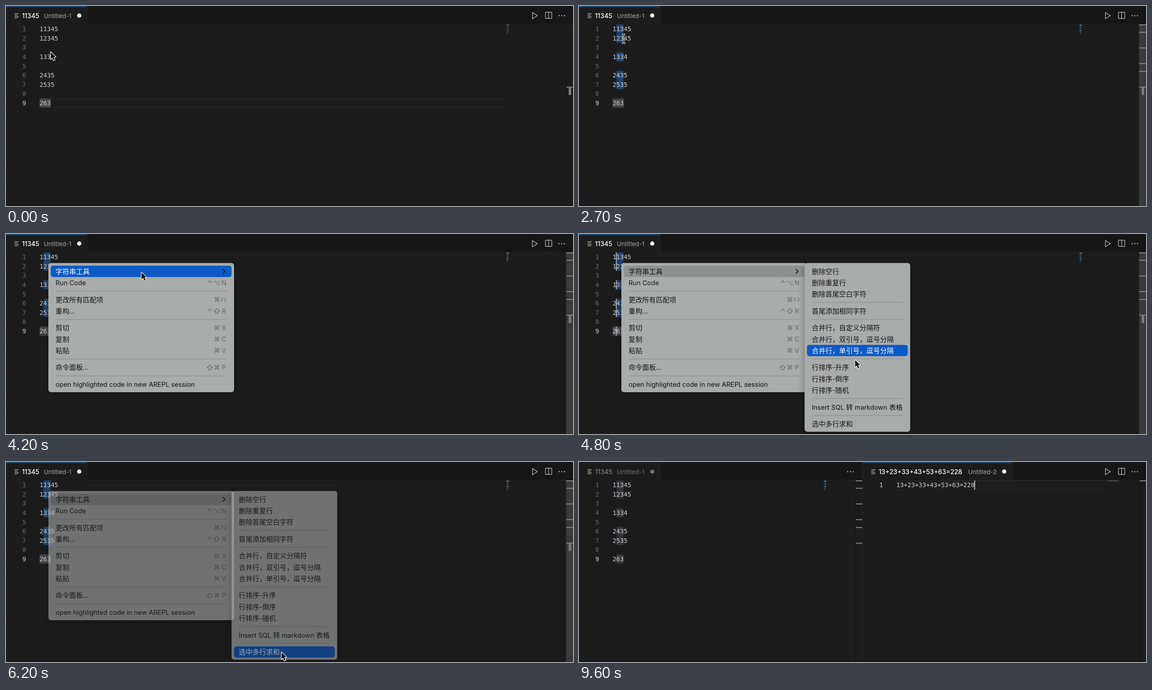
Write an HTML page with a canvas that moves like this. It is 1258 px wide and 445 px high and loops after 9.7 s.

```html
<!DOCTYPE html>
<html lang="zh-CN">
<head>
<meta charset="utf-8">
<title>Editor: sum selected lines</title>
<style>
html, body { margin: 0; width: 100%; height: 100%; overflow: hidden; background: #1c1c1c; }
canvas { display: block; width: 1258px; height: 445px; }
</style>
</head>
<body>
<canvas id="stage" width="1258" height="445"></canvas>
<script>
const W = 1258, H = 445, LOOP = 9700, STEP = 100;
const main = document.getElementById('stage').getContext('2d');
const layer = document.createElement('canvas');
layer.width = W;
layer.height = H;
const layerCtx = layer.getContext('2d');
let ctx = main;

const MONO = '13.74px "DejaVu Sans Mono", monospace';
const UI = 'Inter, "Noto Sans CJK SC", sans-serif';
const CJK = '"Noto Sans CJK SC", "Noto Sans CJK", sans-serif';
const ROW = 20.6, TOP = 41, CHAR = 8.27, GUTTER = 74.5;
const ITEM = 25.15, GAP = 12.6;
const LINES = ['11345', '12345', '', '1334', '', '2435', '2535', '', '263'];
const SUM = '13+23+33+43+53+63=228';

// Times of the hard changes
const DRAG = 1200, DRAG_END = 1900, MENU = 3700, SUBMENU = 4300,
  CLICK = 5800, FADE = 6100, MENU_END = 6350, SPLIT = 6500, LEAVE = 7700;

const PATH = [
  [0, 98.5, 101], [800, 98, 216], [DRAG, 98, 216], [1500, 84, 160],
  [DRAG_END, 84, 52], [2150, 103, 75], [2300, 103, 75], [2500, 99, 73],
  [3100, 99, 73], [3500, 93, 68], [3900, 93, 68], [4200, 300, 84],
  [4500, 520, 100], [4700, 600, 230], [4800, 612, 279], [5300, 610.5, 422]
];

const MENU_ITEMS = [
  ['字符串工具', '>'], ['Run Code', '⌃⌥N'], null,
  ['更改所有匹配项', '⌘F2'], ['重构...', '⌃⇧R'], null,
  ['剪切', '⌘X'], ['复制', '⌘C'], ['粘贴', '⌘V'], null,
  ['命令面板...', '⇧⌘P'], null,
  ['open highlighted code in new AREPL session', '']
];
const SUB_ITEMS = [
  ['删除空行'], ['删除重复行'], ['删除首尾空白字符'], null,
  ['首尾添加相同字符'], null,
  ['合并行，自定义分隔符'], ['合并行，双引号，逗号分隔'], ['合并行，单引号，逗号分隔'], null,
  ['行排序-升序'], ['行排序-倒序'], ['行排序-随机'], null,
  ['Insert SQL 转 markdown 表格'], null,
  ['选中多行求和']
];

const clamp = (v, lo, hi) => Math.min(hi, Math.max(lo, v));

function mouseAt(t) {
  const i = PATH.findIndex(p => p[0] > t);
  if (i < 0) return PATH[PATH.length - 1].slice(1);
  const [t0, x0, y0] = PATH[i - 1], [t1, x1, y1] = PATH[i];
  const k = (t - t0) / (t1 - t0);
  return [x0 + (x1 - x0) * k, y0 + (y1 - y0) * k];
}

function rect(x, y, w, h, color) {
  ctx.fillStyle = color;
  ctx.fillRect(x, y, w, h);
}

function round(x, y, w, h, r, color) {
  ctx.fillStyle = color;
  ctx.beginPath();
  ctx.roundRect(x, y, w, h, r);
  ctx.fill();
}

function disc(x, y, r, color) {
  ctx.fillStyle = color;
  ctx.beginPath();
  ctx.arc(x, y, r, 0, 7);
  ctx.fill();
}

function poly(points, close) {
  ctx.beginPath();
  points.forEach(([x, y]) => ctx.lineTo(x, y));
  if (close) ctx.closePath();
}

function stroke(color, width) {
  ctx.strokeStyle = color;
  ctx.lineWidth = width;
  ctx.stroke();
}

function text(str, x, y, font, color, align = 'left') {
  ctx.font = font;
  ctx.fillStyle = color;
  ctx.textAlign = align;
  ctx.fillText(str, x, y);
}

// Chinese glyphs are set slightly larger than the Latin ones
function mixed(str, x, y, color) {
  for (const run of str.match(/[\u3000-\uffef]+|[^\u3000-\uffef]+/g)) {
    const font = /[\u3000-\uffef]/.test(run) ? '15.15px ' + CJK : '14.55px ' + UI;
    text(run, x, y, font, color);
    x += ctx.measureText(run).width;
  }
}

function dots(x) {
  for (const d of [-6, 0, 6]) disc(x + d, 21.5, 1.2, '#cccccc');
}

function tab(x, w, label, desc, descX, active) {
  rect(x, 1, w, 40, '#1c1c1c');
  rect(x + w - 0.5, 1, 1, 40, '#292929');
  if (active) rect(x, 1, w, 1.2, '#1f68ab');
  [[16.5, 9.5], [19.6, 6.5], [22.7, 9.5], [25.8, 8]].forEach(([y, len]) =>
    rect(x + 19, y, len, 1.2, '#bdbdbd'));
  text(label, x + 35.5, 26.8, (active ? '500 14.1px ' : '14.4px ') + UI, active ? '#ffffff' : '#8e8e8e');
  text(desc, descX, 26.8, '13.45px ' + UI, active ? '#a8a8a8' : '#747474');
  disc(x + w - 17, 21.3, 4.7, active ? '#ffffff' : '#6c6c6c');
}

function tools() {
  poly([[1168, 14.5], [1179, 21.5], [1168, 28.5]], true);
  stroke('#cccccc', 1.2);
  ctx.beginPath();
  ctx.roundRect(1196.9, 13.7, 14, 14, 1);
  ctx.moveTo(1203.9, 13.7);
  ctx.lineTo(1203.9, 27.7);
  stroke('#cccccc', 1.2);
  dots(1233);
}

function codeLine(str, i, x, numX, active) {
  const y = Math.round(TOP + i * ROW + 15.2);
  text(String(i + 1), numX, y, MONO, active ? '#d0d0d0' : '#646a72', 'right');
  text(str, x, y, MONO, '#cdcdcd');
}

function lineFrame(i, x, right) {
  rect(x, TOP + i * ROW, right - x, 1.2, '#292929');
  rect(x, TOP + (i + 1) * ROW - 1.4, right - x, 1.2, '#292929');
}

function caret(i, x) {
  rect(x - 1, TOP + i * ROW, 2, ROW, '#b4b4b4');
}

function minimap(x, lines, sel) {
  lines.forEach((str, i) => {
    for (let c = 0; c < str.length; c++) {
      const hot = sel && i >= sel.row && c >= sel.col && c < 3;
      const y = TOP + 0.2 + i * 2.29;
      if (hot) rect(x + c * 1.15, y - 0.2, 1.15, 2.29, '#234a72');
      rect(x + c * 1.15, y, 0.9, 1.7, hot ? '#5d83a8' : '#707070');
    }
  });
}

// The first mark is kept inside the ruler
function rulerMark(x, i) {
  rect(x, Math.max(TOP, TOP - 1 + i * 17.45), 15, 2, '#898989');
}

function selectionAt(t) {
  if (t <= DRAG) return null;
  if (t >= DRAG_END) return { row: 0, col: 1 };
  const [x, y] = mouseAt(t);
  return {
    row: clamp(Math.floor((y - TOP) / ROW), 0, 8),
    col: clamp(Math.round((x - GUTTER) / CHAR), 1, 3)
  };
}

function caretOn(t) {
  if (t >= SPLIT) return (t - SPLIT) % 1000 < 500;
  if (t < DRAG) return t >= 300 && t < 800;
  if (t < MENU) return t < 2700 || t >= 3200;
  return (t - MENU) % 1000 < 500;
}

function editor(t) {
  const split = t >= SPLIT, right = split ? 629 : W;
  const sel = selectionAt(t);
  const rulerX = right - 15.5;

  tab(0, 179.5, '11345', 'Untitled-1', 84, !split);
  if (split) dots(602);

  if (!sel) lineFrame(8, GUTTER, 1106);
  if (!split) rect(GUTTER, TOP + 8 * ROW, 25, ROW - 0.3, sel ? '#424548' : '#474747');
  LINES.forEach((str, i) => {
    if (sel && str && i >= sel.row && sel.col < 3 && (split || i < 8)) {
      round(GUTTER + sel.col * CHAR, TOP + i * ROW, (3 - sel.col) * CHAR, ROW - 0.2, 3,
        split ? '#333439' : '#20436c');
    }
    codeLine(str, i, GUTTER, 44.5, i === 8);
    const own = sel ? i >= sel.row : i === 8;
    if (!split && str && own && caretOn(t)) caret(i, GUTTER + (sel ? sel.col : 3) * CHAR);
  });

  const fade = split ? clamp((8600 - t) / 600, 0, 1) : +(t >= 1300);
  if (split && t >= 6700) rect(539, TOP, 74, 101.5, `rgba(121,121,121,${0.16 * fade})`);
  minimap(split ? 543.5 : 1110.5, LINES, sel);

  rect(rulerX - 0.5, TOP, 1, H - TOP, '#121212');
  rect(rulerX, TOP, 15.5, H - TOP, `rgba(121,121,121,${0.34 * fade})`);
  LINES.forEach((str, i) => {
    const marked = sel ? str && i >= sel.row : i === 8;
    if (marked) rulerMark(rulerX + 0.5, i);
  });
  if (!split) rect(1248.5, 181.6, 5.5, 16.4, '#7c7c7c');

  if (split) sumEditor(t);
}

function sumEditor(t) {
  const x = 704;
  rect(628.5, 0, 1, H, '#2b2b2b');
  tab(629.5, 331, SUM, 'Untitled-2', 863.5, true);
  lineFrame(0, x, 1168);
  codeLine(SUM, 0, x, 674.5, true);
  if (caretOn(t)) caret(0, x + SUM.length * CHAR + 0.3);
  minimap(1173, [SUM], null);
  rect(1243, TOP, 1, H - TOP, '#121212');
  rulerMark(1244, 0);
}

function shortcut(keys, y, color) {
  if (keys === '>') {
    poly([[481, y - 5], [486, y], [481, y + 5]]);
    stroke('#1a1a1a', 2);
    return;
  }
  const mods = [...keys].filter(k => '⌃⌥⇧⌘'.includes(k));
  const key = keys.slice(mods.length);
  if (key === 'F2') text(key, 490, y + 4.3, '11px ' + UI, color, 'right');
  else text(key, 483.5, y + 5.4, '14.5px ' + UI, color, 'center');
  mods.reverse().forEach((m, i) => {
    const x = 468 - i * 16;
    if (m === '⌃') {
      poly([[x - 4.5, y + 0.5], [x, y - 4.5], [x + 4.5, y + 0.5]]);
      stroke(color, 1.3);
    } else if (m === '⇧') {
      poly([[x, y - 5.5], [x + 6, y + 0.5], [x + 3, y + 0.5], [x + 3, y + 5],
        [x - 3, y + 5], [x - 3, y + 0.5], [x - 6, y + 0.5]], true);
      stroke(color, 1.2);
    } else {
      text(m, x, y + 5, '14px "DejaVu Sans", sans-serif', color, 'center');
    }
  });
}

// Calls visit with every item and its centre; separators arrive as null
function eachItem(items, visit) {
  let y = 83.1, n = 0;
  for (const item of items) {
    if (item) {
      visit(item, y, n++);
      y += ITEM;
    } else {
      visit(null, y - GAP / 2, -1);
      y += GAP;
    }
  }
}

function itemAt(items, py) {
  let hit = -1;
  eachItem(items, (item, y, n) => {
    if (item && Math.abs(py - y) <= ITEM / 2) hit = n;
  });
  return hit;
}

function menu(items, x, w, h, hot, hotColor, alpha) {
  ctx = layerCtx;
  ctx.clearRect(0, 0, W, H);
  ctx.shadowColor = 'rgba(0,0,0,0.35)';
  ctx.shadowBlur = 14;
  ctx.shadowOffsetY = 4;
  round(x, 64.5, w, h, 6, '#a8acaa');
  ctx.shadowColor = 'transparent';
  eachItem(items, (item, y, n) => {
    if (!item) {
      rect(x + 16, y - 0.6, w - 32, 1.2, '#8b8f8d');
      return;
    }
    const on = n === hot;
    const lit = on && hotColor === '#0b5ac6';
    if (on) round(x + 5.5, y - ITEM / 2, w - 11, ITEM, 5, hotColor);
    mixed(item[0], x + 16, y + 5.5, lit ? '#ffffff' : '#161616');
    if (item[1]) shortcut(item[1], y, lit ? '#d5e2f5' : '#686b6a');
  });
  ctx = main;
  ctx.globalAlpha = alpha;
  ctx.drawImage(layer, 0, 0);
  ctx.globalAlpha = 1;
}

function menus(t) {
  if (t < MENU || t >= MENU_END) return;
  const alpha = t < FADE ? 1 : clamp(1 - (t - FADE) / 250, 0, 1);
  const [mx, my] = mouseAt(t - 40);
  const blue = '#0b5ac6';
  const open = t >= SUBMENU, inSub = open && mx > 500;
  const hot = inSub ? 0 : mx > 99 ? itemAt(MENU_ITEMS, my) : -1;
  menu(MENU_ITEMS, 94, 412, 287.5, hot, inSub ? '#8d918f' : blue, alpha);
  if (!open) return;
  const blink = t >= CLICK && t < CLICK + 100;
  menu(SUB_ITEMS, 500.5, 234.3, 375.5, inSub && !blink ? itemAt(SUB_ITEMS, my) : -1, blue, alpha);
}

function pointer(t) {
  if (t >= LEAVE) return;
  const [x, y] = mouseAt(t);
  ctx.save();
  ctx.translate(x, y);
  ctx.lineJoin = 'round';
  if (t >= 100 && t < 3500) {
    ctx.beginPath();
    ctx.moveTo(-4, -10);
    ctx.quadraticCurveTo(0, -10, 0, -6.5);
    ctx.quadraticCurveTo(0, -10, 4, -10);
    ctx.moveTo(0, -7);
    ctx.lineTo(0, 7);
    ctx.moveTo(-4, 10);
    ctx.quadraticCurveTo(0, 10, 0, 6.5);
    ctx.quadraticCurveTo(0, 10, 4, 10);
    ctx.moveTo(-2.5, 3.5);
    ctx.lineTo(2.5, 3.5);
    stroke('#e8e8e8', 3);
    stroke('#111111', 1.1);
  } else {
    poly([[0.8, 1.5], [0.8, 17], [4.3, 13.6], [7, 19.8], [9.6, 18.7], [7, 12.6], [11.6, 12.3]], true);
    stroke('#f2f2f2', 2.6);
    ctx.fillStyle = '#0a0a0a';
    ctx.fill();
  }
  ctx.restore();
}

function draw(t) {
  rect(0, 0, W, H, '#1c1c1c');
  rect(0, 0, W, TOP, '#161616');
  rect(0, 0, W, 1, '#212121');
  rect(0, 40, W, 1, '#282828');
  editor(t);
  tools();
  for (let i = 0; i < 8; i++) {
    rect(0, 50 + i * 50.4, 4, 1, [0, 5, 6].includes(i) ? '#0b3f0d' : '#262826');
  }
  menus(t);
  pointer(t);
}

const start = performance.now();
function frame() {
  const t = (performance.now() - start) % LOOP;
  draw(Math.floor(t / STEP) * STEP);
  requestAnimationFrame(frame);
}
frame();
</script>
</body>
</html>
```
